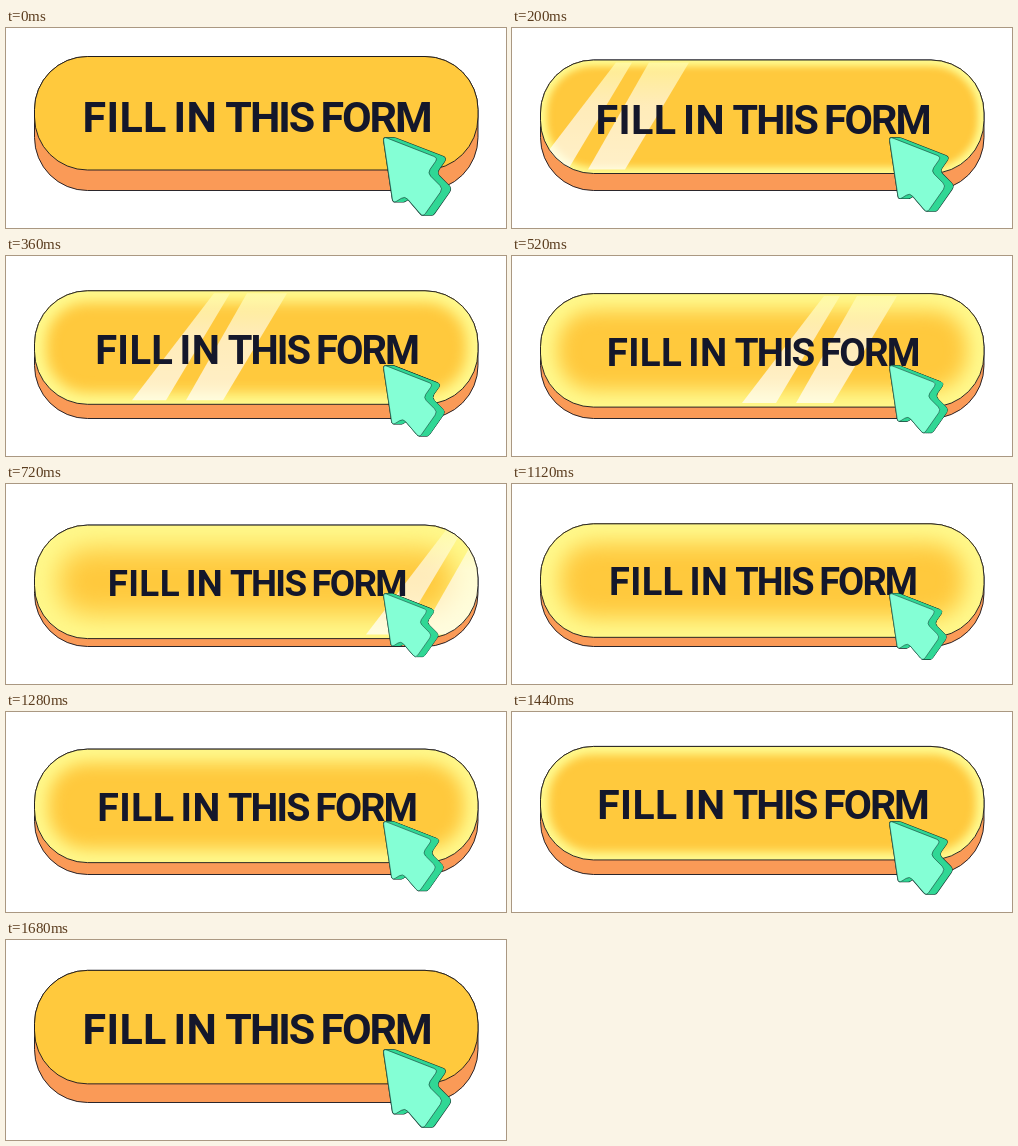
An HTML page for the animation above (1.72 s loop, 500x200 px).

```html
<!DOCTYPE html>
<html lang="en">
<head>
<meta charset="utf-8">
<title>Fill in this form</title>
<style>
  html, body { margin: 0; width: 100%; height: 100%; overflow: hidden; background: #fff; }
  svg { display: block; width: 100vw; height: 100vh; }
  text { font: 600 43px Roboto, "Open Sans", sans-serif; fill: #14172b; }
</style>
</head>
<body>
<svg viewBox="0 0 500 200">
  <defs>
    <clipPath id="inside"><rect x="28.5" y="28.5" width="443.5" height="113.5" rx="53"/></clipPath>
    <filter id="soft" filterUnits="userSpaceOnUse" x="-50" y="-50" width="600" height="300" color-interpolation-filters="sRGB">
      <feGaussianBlur id="blur" stdDeviation="1"/>
    </filter>
    <linearGradient id="sheen" x1="0" y1="0" x2="0" y2="1">
      <stop offset="0" stop-color="#fffcb0" stop-opacity=".7"/>
      <stop offset=".4" stop-color="#fff" stop-opacity=".64"/>
      <stop offset="1" stop-color="#fff" stop-opacity=".72"/>
    </linearGradient>
  </defs>

  <rect id="side" x="28.5" width="443.5" rx="53" fill="#fa9a57" stroke="#14141e" stroke-width=".9"/>
  <g id="face">
    <rect x="28.5" y="28.5" width="443.5" height="113.5" rx="53" fill="#ffc93d"/>
    <g clip-path="url(#inside)">
      <rect id="glow" x="28.5" y="28.5" width="443.5" height="113.5" rx="53" fill="none" stroke="#fffb90" filter="url(#soft)"/>
      <g id="shine" fill="url(#sheen)">
        <path d="M208 31H224L160 138H126Z"/>
        <path d="M241 31H281L217 138H180Z"/>
      </g>
    </g>
    <rect x="28.5" y="28.5" width="443.5" height="113.5" rx="53" fill="none" stroke="#14141e" stroke-width=".9"/>
  </g>

  <g id="label">
    <text x="76.5" y="104" letter-spacing=".4">FILL</text>
    <text x="167.5" y="104" letter-spacing=".5">IN</text>
    <text x="219.3" y="104" letter-spacing="-2">THIS</text>
    <text x="314.5" y="104" letter-spacing="-2.1">FORM</text>
  </g>

  <g id="cursor" stroke-linejoin="round">
    <path id="rim" fill="none" stroke="#14302c" stroke-width="1.1"/>
    <path id="depth" fill="#30d795"/>
    <path id="front" fill="#84ffd5" stroke="#14302c" stroke-width=".6"/>
  </g>
</svg>
<script>
const LOOP = 1720, STEP = 40, PEAK = 860, BACK = 1680;
const $ = id => document.getElementById(id);
const set = (id, attrs) => {
  for (const k in attrs) $(id).setAttribute(k, attrs[k]);
};

// Polygon path with rounded corners
function rounded(points, r, dx = 0) {
  const n = points.length;
  const toward = (a, b) => {
    const k = r / Math.hypot(b[0] - a[0], b[1] - a[1]);
    return [a[0] + (b[0] - a[0]) * k + dx, a[1] + (b[1] - a[1]) * k];
  };
  return points.map((p, i) => {
    const a = toward(p, points[(i + n - 1) % n]);
    const b = toward(p, points[(i + 1) % n]);
    return `${i ? "L" : "M"}${a}Q${p[0] + dx},${p[1]} ${b}`;
  }).join("") + "Z";
}

const arrow = [[377, 108.5], [432, 130], [421.5, 145], [437, 160.5], [417, 189], [399, 168], [387, 175.5]];
let solid = "";
for (let i = 0; i <= 12; i++) solid += rounded(arrow, 4.5, i * 0.75);
set("rim", { d: solid });
set("depth", { d: solid });
set("front", { d: rounded(arrow, 4.5) });

// Linear rise to the peak, then linear fall
const ramp = (t, peak, end) =>
  Math.max(0, t < peak ? t / peak : (end - t) / (end - peak));

const scaleAt = (x, y, s) => `translate(${x} ${y}) scale(${s}) translate(${-x} ${-y})`;

function draw(t) {
  const press = ramp(t, PEAK, BACK);
  const drop = 15.4 * ramp(t, 880, 1790);
  const sigma = 17 * press;

  set("side", { y: 28.5 + drop, height: 134 - drop });
  set("face", { transform: `translate(0 ${drop})` });
  set("blur", { stdDeviation: Math.max(0.1, sigma) });
  set("glow", { "stroke-width": 3.2 * sigma, visibility: press > 0 ? "visible" : "hidden" });
  set("shine", { transform: `translate(${0.65 * (t - 360)} 0)` });
  set("label", { transform: `translate(0 ${12.8 * press}) ${scaleAt(252, 88.5, 1 - 0.172 * press)}` });
  set("cursor", { transform: scaleAt(378, 110, 1 - 0.225 * press) });
}

const start = performance.now();
function tick() {
  const t = (performance.now() - start) % LOOP;
  draw(Math.floor(t / STEP) * STEP);
  requestAnimationFrame(tick);
}
tick();
</script>
</body>
</html>
```
